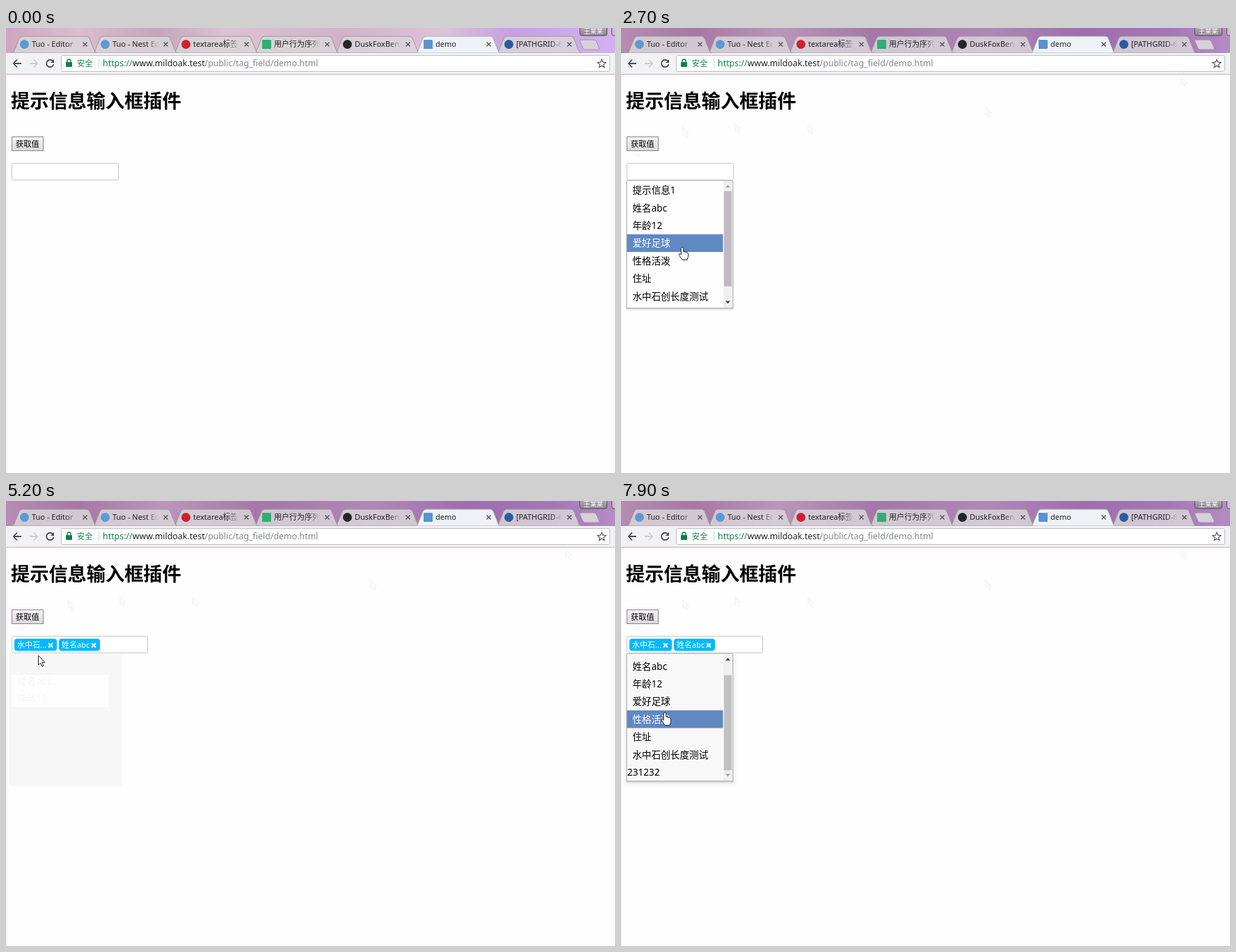
These frames come from a looping animation (875x640 px, 8 s). An HTML page:

```html
<!DOCTYPE html>
<html lang="zh">
<head>
<meta charset="utf-8">
<title>demo</title>
<style>
html, body { margin: 0; width: 100%; height: 100%; overflow: hidden; background: #fefefe; }
svg { display: block; width: 875px; height: 640px; }
text { font-family: "Noto Sans", "Noto Sans CJK SC", "Noto Sans CJK JP", sans-serif; white-space: pre; }
</style>
</head>
<body>
<svg id="stage" viewBox="0 0 875 640">
  <defs>
    <linearGradient id="pale">
      <stop offset="0" stop-color="#cfa6c0"/><stop offset=".12" stop-color="#dcbccd"/>
      <stop offset=".25" stop-color="#c6a5ba"/><stop offset=".36" stop-color="#dcc3d0"/>
      <stop offset=".55" stop-color="#d2b2c8"/><stop offset=".72" stop-color="#dcc2da"/>
      <stop offset=".83" stop-color="#c69fe0"/><stop offset="1" stop-color="#d3b1ee"/>
    </linearGradient>
    <linearGradient id="deep">
      <stop offset="0" stop-color="#b58cb3"/><stop offset=".12" stop-color="#a678a6"/>
      <stop offset=".26" stop-color="#bb95ba"/><stop offset=".42" stop-color="#a377a8"/>
      <stop offset=".6" stop-color="#b088b8"/><stop offset=".76" stop-color="#9c6eab"/>
      <stop offset=".9" stop-color="#a577b6"/><stop offset="1" stop-color="#b48cc4"/>
    </linearGradient>
    <linearGradient id="face" x2="0" y2="1">
      <stop offset="0" stop-color="#f5f3f5"/><stop offset="1" stop-color="#dcd9dc"/>
    </linearGradient>
    <linearGradient id="badge" x2="0" y2="1">
      <stop offset="0" stop-color="#b3a9b6"/><stop offset="1" stop-color="#8a808e"/>
    </linearGradient>
    <linearGradient id="fade">
      <stop offset=".75" stop-color="#fff"/><stop offset="1" stop-color="#000"/>
    </linearGradient>
    <mask id="tabMask" maskUnits="userSpaceOnUse" x="28" y="10" width="67" height="26">
      <rect x="28" y="10" width="67" height="26" fill="url(#fade)"/>
    </mask>
    <clipPath id="listClip"><rect x="8" y="220" width="139" height="183"/></clipPath>
    <path id="arrow" d="M.5 .5V14l3.1-3 2.2 5 2-.9-2.1-4.9H10z"/>
    <path id="hand" d="M-1.7 1.6Q-1.6 .2 0 .2T1.7 1.6V6.4L6.6 7.6Q8.6 8.2 8.6 10V13.4L7 18.5H0L-4.6 11.6Q-5.2 9.4-3.2 9.6L-1.7 11.2Z"/>
    <path id="beam" d="M-3-6.5H-1L0-5.7 1-6.5H3M0-5.7V5.7M-3 6.5H-1L0 5.7 1 6.5H3"/>
  </defs>

  <rect id="strip" width="875" height="36" fill="url(#pale)"/>
  <g id="tabs"></g>
  <path d="M825 17h20q2 0 3 2l4 9q1 3-1 3h-19q-2 0-3-2l-4-9q-1-3 0-3z" fill="#d9d0da" stroke="#a294a6"/>
  <g stroke="#5d5360">
    <path d="M824.500-1V8q0 3 3 3h33q3 0 3-3V-1z" fill="url(#badge)"/>
    <path d="M870.500-1V8q0 3 3 3h4V-1z" fill="#cbbdd0"/>
  </g>
  <rect y="36" width="875" height="30" fill="#f1f2f5"/>
  <rect y="66" width="875" height="1" fill="#dba9ad"/>
  <rect y="67" width="1" height="573" fill="#ece9ec"/>
  <g fill="none" stroke="#4d4d52" stroke-width="1.8">
    <path d="M22 51H11.500M16 45.500 10.800 51 16 56.500"/>
    <path d="M34 51H44.500M40 45.500 45.200 51 40 56.500" stroke="#cdcdd1"/>
    <path d="M67.500 47.800A5.200 5.200 0 1 0 68.400 52.200"/>
    <path d="M69 45v5h-5z" fill="#4d4d52" stroke="none"/>
  </g>
  <rect x="79.500" y="39.500" width="788" height="23" rx="2" fill="#fff" stroke="#bfbfc4"/>
  <rect x="86" y="49" width="9" height="7" rx="1" fill="#0b8043"/>
  <path d="M88 49v-1.500a2.500 2.500 0 0 1 5 0V49" fill="none" stroke="#0b8043" stroke-width="1.400"/>
  <rect x="133" y="44" width="1" height="13" fill="#d0d0d0"/>
  <text x="139" y="55" font-size="12.400" fill="#80868b"><tspan fill="#0b8043">https://</tspan><tspan fill="#222">www.mildoak.test</tspan>/public/tag_field/demo.html</text>
  <path d="M856 45.200l1.700 4 4.300.4-3.300 2.800 1 4.200-3.700-2.300-3.700 2.300 1-4.200-3.300-2.800 4.300-.4z" fill="none" stroke="#55555a" stroke-width="1.200"/>

  <g id="trail" fill="#fafafa" stroke="#f4f4f4"></g>
  <g id="residue">
    <rect x="4" y="220" width="162" height="189.500" rx="2" fill="#f7f7f7"/>
    <rect id="patch" x="8.500" width="138.500" fill="#fefefe"/>
    <g id="faint"></g>
  </g>

  <rect id="button" x="8.500" y="156.500" width="45" height="20" fill="url(#face)" stroke="#8f858c"/>
  <rect id="input" x="8.500" y="194.500" height="24" rx="2" fill="#fff" stroke="#c9c6c9"/>
  <g id="chips"></g>
  <rect id="caret" y="200" width="1" height="13.500" fill="#111"/>

  <g id="list">
    <rect x="7" y="221" width="155" height="185" rx="2" fill="#000" opacity=".08"/>
    <rect x="7.500" y="220" width="154" height="184" fill="#000" opacity=".16"/>
    <rect id="panel" x="8.500" y="219.500" width="152" height="183" stroke="#c4c2c4"/>
    <rect id="band" x="9" y="250" width="138" height="46" fill="#fefefe"/>
    <g clip-path="url(#listClip)"><g id="rows"></g></g>
    <rect x="147" y="220" width="13" height="182" fill="#f1f1f1"/>
    <rect id="thumb" x="148" width="11" height="137"/>
    <path id="up" d="M150 229.500h7l-3.500-4z"/>
    <path id="down" d="M150 392.500h7l-3.500 4z"/>
  </g>
  <use id="cursor"/>
</svg>

<script>
const LOOP = 8000, ROW = 25.45, TOP = 220.3, SCROLL = 21;
const LONG = '水中石创长度测试';
const ITEMS = ['提示信息1', '姓名abc', '年龄12', '爱好足球', '性格活泼', '住址', LONG, '231232'];
const NS = 'http://www.w3.org/2000/svg';
const $ = id => document.getElementById(id);

function add(parent, tag, attrs, content) {
  const el = document.createElementNS(NS, tag);
  set(el, attrs);
  if (content) el.textContent = content;
  parent.append(el);
  return el;
}
function set(el, attrs) {
  for (const k in attrs) el.setAttribute(k, attrs[k]);
}
// Text placed by its left edge and vertical middle
const label = (parent, x, mid, size, content, fill = '#000', weight = 400) =>
  add(parent, 'text', { x, y: mid + size * .37, 'font-size': size, fill, 'font-weight': weight }, content);
const show = (el, on) => { el.style.display = on ? '' : 'none'; };

// Browser tabs: title, icon colour, square icon
const TABS = [
  ['Tuo - Editor', '#5b9bd5'], ['Tuo - Nest Edit', '#5b9bd5'], ['textarea标签详', '#cf2030'],
  ['用户行为序列', '#2fae73', 1], ['DuskFoxBen/tag', '#26262a'], ['demo', '#5a92cf', 1],
  ['[PATHGRID-62]', '#2c5aa0']
];
function drawTab(i) {
  const [title, color, square] = TABS[i], active = i === 5;
  const g = add($('tabs'), 'g', { transform: `translate(${8 + 116 * i} 0)` });
  add(g, 'path', {
    d: 'M0 36l3-1 8-20q1.500-3 4-3h93q3 0 4 3l8 20 3 1z',
    fill: active ? '#eef2f7' : '#dbd7db', 'fill-opacity': active ? 1 : .84,
    stroke: active ? '#b5acb8' : '#a2979f'
  });
  add(g, 'rect', { x: 12, y: 17, width: 13, height: 13, rx: square ? 1 : 6.5, fill: color });
  const name = add(g, 'g', { mask: 'url(#tabMask)' });
  label(name, 29, 23, 11, title, '#222');
  add(g, 'path', { d: 'M102.500 20.500l6 6m0-6l-6 6', stroke: '#55505a', 'stroke-width': 1.3 });
}
[6, 4, 3, 2, 1, 0, 5].forEach(drawTab);

label($('stage'), 830, 5, 9.3, '王某某', '#fff');
label($('stage'), 102, 51, 11.2, '安全', '#0b8043');
label($('stage'), 7, 105.3, 27.2, '提示信息输入框插件', '#000', 700);
label($('stage'), 14, 166.5, 11.3, '获取值');
$('stage').append($('cursor'));

const rows = ITEMS.map((item, i) => {
  const y = TOP + ROW * i;
  const bar = add($('rows'), 'rect', { x: 8.5, y, width: 138, height: ROW, fill: '#6088c3' });
  return { bar, text: label($('rows'), i === 7 ? 9 : 16.5, y + ROW / 2, 13.6, item) };
});
const faint = ITEMS.slice(0, 3).map((item, i) =>
  label($('faint'), 16.5, TOP + ROW * (i + .5), 13.6, item, '#f5f5f5'));

const chips = [[12, 61, LONG.slice(0, 3) + '...'], [76, 59, ITEMS[1]]].map(([x, width, content]) => {
  const g = add($('chips'), 'g', {});
  add(g, 'rect', { x, y: 198, width, height: 17.5, rx: 4, fill: '#00b9ff' });
  label(g, x + 4, 206.5, 11, content, '#fff');
  const cx = x + width - 9;
  add(g, 'path', { d: `M${cx - 3} 204.500l6 6m0-6l-6 6`, stroke: '#fff', 'stroke-width': 2 });
  return g;
});

// Pointer runs: start time, then one x, y pair every 100 ms
const RUNS = [
  [300, 804, 69, 523, 112, 268, 137, 163, 136, 88, 141, 50, 153, 32, 163, 25, 168, 23, 169],
  [1200, 21, 170, 19, 171],
  [1800, 27, 199],
  [2500, 34, 226, 62, 272, 88, 315, 96, 343, 100, 374, 100, 381, 101, 371, 98, 362],
  [3700, 97, 352, 86, 315, 69, 258, 114, 237, 139, 217],
  [4500, 128, 223, 104, 230, 78, 237, 56, 242, 46, 244],
  [5200, 46, 222, 46, 213, 44, 203],
  [5700, 45, 200, 49, 204],
  [6000, 56, 205, 66, 206, 76, 207, 86, 207],
  [6500, 108, 208, 152, 215, 160, 219, 142, 207],
  [7300, 122, 232, 105, 246, 92, 262, 82, 278, 74, 290, 66, 302, 63, 304]
];
// Open list: from, to, caret x
const OPEN = [[2000, 3700, 13], [4300, 5200, 78], [7100, LOOP, 141]];

function pointer(t) {
  const run = RUNS.filter(r => r[0] <= t).pop();
  if (!run) return null;
  const i = Math.min(Math.floor((t - run[0]) / 100), (run.length - 1) / 2 - 1);
  return [run[1 + 2 * i], run[2 + 2 * i]];
}

const trail = [300, 400, 500, 600, 700, 1300].map(t => {
  const [x, y] = pointer(t);
  return { t, el: add($('trail'), 'use', { href: '#arrow', x, y }) };
});

function draw(t) {
  const open = OPEN.find(o => t >= o[0] && t < o[1]);
  const tags = (t >= 3700) + (t >= 5200);
  const width = [153, 171, 195][tags];
  const scrolled = t >= 3000;
  const pos = pointer(t);

  $('strip').setAttribute('fill', t < 2000 ? 'url(#pale)' : 'url(#deep)');
  trail.forEach(g => show(g.el, t >= g.t + 100));
  show($('residue'), tags);
  const top = tags > 1 ? 250 : 220;
  set($('patch'), { y: top, height: 296 - top });
  show(faint[0], tags < 2);

  $('input').setAttribute('width', width);
  chips.forEach((c, i) => show(c, i < tags));
  show($('caret'), open && (t - open[0]) % 1000 < 500);
  if (open) $('caret').setAttribute('x', open[2]);

  let shape = 'arrow', hover = -1;
  if (pos) {
    const [x, y] = pos;
    const overTag = x < [8, 74, 136][tags];
    if (open && y >= 220 && y < 403 && x < 147) {
      shape = 'hand';
      hover = Math.floor((y - TOP + (scrolled ? SCROLL : 0)) / ROW);
    } else if (y > 194 && y < 219 && x < 8 + width && !overTag) shape = 'beam';
    set($('cursor'), {
      href: '#' + shape, x, y, fill: shape === 'beam' ? 'none' : '#fff', stroke: '#26262c'
    });
    const onButton = x > 8 && x < 54 && y > 156 && y < 177;
    $('button').setAttribute('stroke', onButton ? '#6f666d' : '#8f858c');
  }
  show($('cursor'), pos);

  show($('list'), open);
  $('panel').setAttribute('fill', tags ? '#f8f8f8' : '#fefefe');
  show($('band'), tags && t < 7600);
  $('rows').setAttribute('transform', `translate(0 ${scrolled ? -SCROLL : 0})`);
  rows.forEach((r, i) => {
    show(r.bar, i === hover);
    r.text.setAttribute('fill', i === hover ? '#fff' : '#000');
  });
  set($('thumb'), { y: scrolled ? 250.5 : 234.5, fill: tags ? '#c1c1c1' : '#c1b9c2' });
  $('up').setAttribute('fill', scrolled ? '#444' : '#a5a5a5');
  $('down').setAttribute('fill', scrolled ? '#a5a5a5' : '#444');
}

const start = performance.now();
function tick(now) {
  draw(Math.max(0, now - start) % LOOP);
  requestAnimationFrame(tick);
}
draw(0);
requestAnimationFrame(tick);
</script>
</body>
</html>
```
